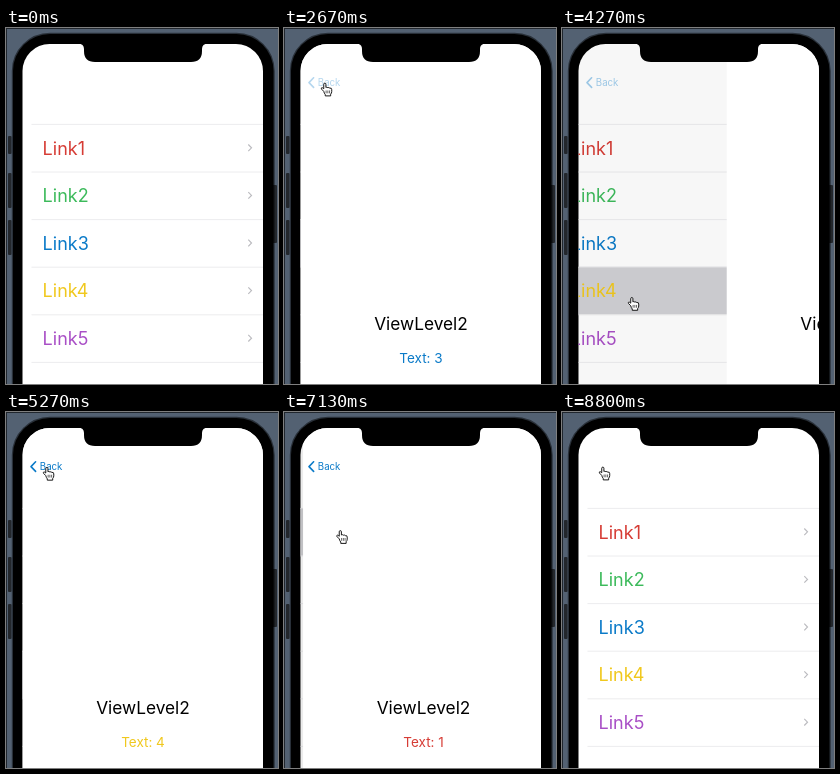
An HTML page for the animation above (9070 ms loop, 272x356 px).

```html
<!DOCTYPE html>
<html lang="en">
<head>
<meta charset="utf-8">
<title>Navigation links</title>
<style>
  html, body { margin: 0; width: 100%; height: 100%; overflow: hidden; background: #536172; }
  svg { display: block; width: 100vw; height: 100vh; }
  text { font-family: Inter, "Liberation Sans", sans-serif; }
</style>
</head>
<body>
<svg viewBox="0 0 272 356">
  <defs>
    <clipPath id="screen"><rect x="16.5" y="16" width="240.5" height="400" rx="27"/></clipPath>
  </defs>
  <rect width="272" height="356" fill="#536172"/>
  <path d="M0 356V0H272V1H1V356Z" fill="#20262d"/>
  <g fill="#23272c">
    <rect x="2" y="108" width="3.5" height="18" rx="1"/>
    <rect x="2" y="145" width="3.5" height="35" rx="1"/>
    <rect x="2" y="192" width="3.5" height="35" rx="1"/>
    <rect x="266" y="157" width="5" height="58" rx="1"/>
  </g>
  <rect x="7" y="6" width="260.5" height="420" rx="37" stroke="#000" stroke-opacity=".5" stroke-width="2.4"/>
  <g clip-path="url(#screen)">
    <rect x="16" y="15" width="242" height="341" fill="#fff"/>
    <g id="list"></g>
    <rect id="dim" x="16" y="15" width="242" height="341"/>
    <g id="detail" text-anchor="middle">
      <rect x="16.5" y="15" width="242" height="341" fill="#fff"/>
      <text x="137" y="301.5" font-size="17.3">ViewLevel2</text>
      <text id="label" x="137" y="334.6" font-size="13.5"></text>
    </g>
    <g id="back" fill="#0a7ac8">
      <path d="M29.6 49.8 25 54.6 29.6 59.4" fill="none" stroke="#0a7ac8" stroke-width="1.6" stroke-linecap="round" stroke-linejoin="round"/>
      <text x="33.8" y="58.2" font-size="9.7">Back</text>
    </g>
  </g>
  <path d="M72 15.5Q78 15.9 78 21V23Q78 34 89 34H185Q196 34 196 23V21Q196 15.9 202 15.5Z"/>
  <g id="cursor" stroke="#111" stroke-width=".9" stroke-linejoin="round">
    <path fill="#fff" d="M3 8.2 1 6.2Q.2 5 1.3 4.8 2 4.7 3 5.8V1.6Q3 .6 4 .6 5 .6 5 1.6V4.6Q5.8 3.9 6.8 4.8 7.8 4.3 8.6 5.2 10.4 4.8 10.4 6.6V8.4Q10.4 9.8 9.4 10.8V12.4H4.4V11.2Q3.4 10 3 8.2Z"/>
    <path fill="none" stroke-width=".6" d="M5.2 7.4V10M6.8 7.4V10M8.4 7.4V10"/>
  </g>
</svg>
<script>
const LOOP = 9070, WIDTH = 241, FPS = 15 / 1000;
const COLORS = ['#d63c35', '#3cba5b', '#0a7ac8', '#f0c81e', '#a94fc6'];
const ROW_TOP = 96, ROW_STEP = 47.6;
const ENTRY = [-7, 150], BACK = [42.5, 61.5];

// Each visit opens a row's view (push) and leaves it again (pop), in ms.
const VISITS = [
  { row: 2, push: 1035, pop: 2740 },
  { row: 3, push: 4200, pop: 5640 },
  { row: 0, push: 6805, pop: 8245 }
];

const $ = id => document.getElementById(id);
const set = (el, name, value) => el.setAttribute(name, value);
const move = (el, x, y = 0) => set(el, 'transform', `translate(${x.toFixed(2)} ${y.toFixed(2)})`);
const clamp = v => Math.max(0, Math.min(1, v));

const [list, dim, detail, label, back, cursor] =
  ['list', 'dim', 'detail', 'label', 'back', 'cursor'].map($);

const line = y => `<path d="M25.5 ${y.toFixed(1)}H257" stroke="#e8e8ea" stroke-width=".8"/>`;

list.innerHTML = COLORS.map((color, i) => {
  const y = ROW_TOP + i * ROW_STEP, mid = y + ROW_STEP / 2;
  return `<rect class="mark" x="16" y="${y}" width="242" height="${ROW_STEP}" fill="#d1d1d5"/>
    ${line(y + .4)}
    <text x="36.6" y="${mid + 6.7}" font-size="18" fill="${color}">Link${i + 1}</text>
    <path d="M242.3 ${mid - 3.3}l3.2 3.3-3.2 3.3" fill="none" stroke="#bcbcc0" stroke-width="1.2"/>`;
}).join('') + line(ROW_TOP + COLORS.length * ROW_STEP + .4);
const marks = list.querySelectorAll('.mark');

// The cursor glides to the row before each push, and to Back before each pop.
const rowSpot = row => [58 + 4.5 * row, 125 + 50.3 * row];
const glides = VISITS.flatMap(({ row, push, pop }, i) => {
  const spot = rowSpot(row), from = i ? BACK : ENTRY;
  const begin = i ? VISITS[i - 1].pop + 130 : 266;
  return [
    { from, to: spot, begin, end: push - 200, bend: (spot[1] - from[1]) ** 2 / 1030 },
    { from: spot, to: BACK, begin: push + 600, end: pop - 370, bend: 0 }
  ];
});

function cursorAt(t) {
  const g = glides.filter(g => g.begin <= t).pop() || glides[0];
  const e = 1 - (1 - clamp((t - g.begin) / (g.end - g.begin))) ** 1.35;
  const [x, y] = g.from.map((v, i) => v + (g.to[i] - v) * e);
  return [x - g.bend * 4 * e * (1 - e), y];
}

// Critically damped spring from 0 to 1.
function spring(ms) {
  const x = Math.max(0, ms) * .02;
  return 1 - (1 + x) * Math.exp(-x);
}

function render(time) {
  const t = Math.floor(time * FPS + .06) / FPS;
  const visit = VISITS.filter(v => v.push <= t).pop() || VISITS[0];
  const popping = t > visit.pop;
  const shown = popping ? 1 - spring(t - visit.pop) : spring(t - visit.push);

  move(list, -72 * shown);
  move(detail, WIDTH * (1 - shown));
  set(detail, 'visibility', shown > .001 ? 'visible' : 'hidden');
  set(dim, 'opacity', .08 * shown);
  set(back, 'opacity', shown * (t > visit.pop - 110 ? .3 : 1));
  set(label, 'fill', COLORS[visit.row]);
  label.textContent = `Text: ${visit.row + 1}`;

  const glow = t < visit.push ? 0 : 1 - clamp((t - visit.pop) / 420);
  marks.forEach((m, i) => set(m, 'opacity', i === visit.row ? glow : 0));

  const [x, y] = cursorAt(t);
  set(cursor, 'transform', `translate(${(x - 6).toFixed(2)} ${(y - 7).toFixed(2)}) scale(1.08)`);
}

const start = performance.now();
function frame() {
  render((performance.now() - start) % LOOP);
  requestAnimationFrame(frame);
}
frame();
</script>
</body>
</html>
```
